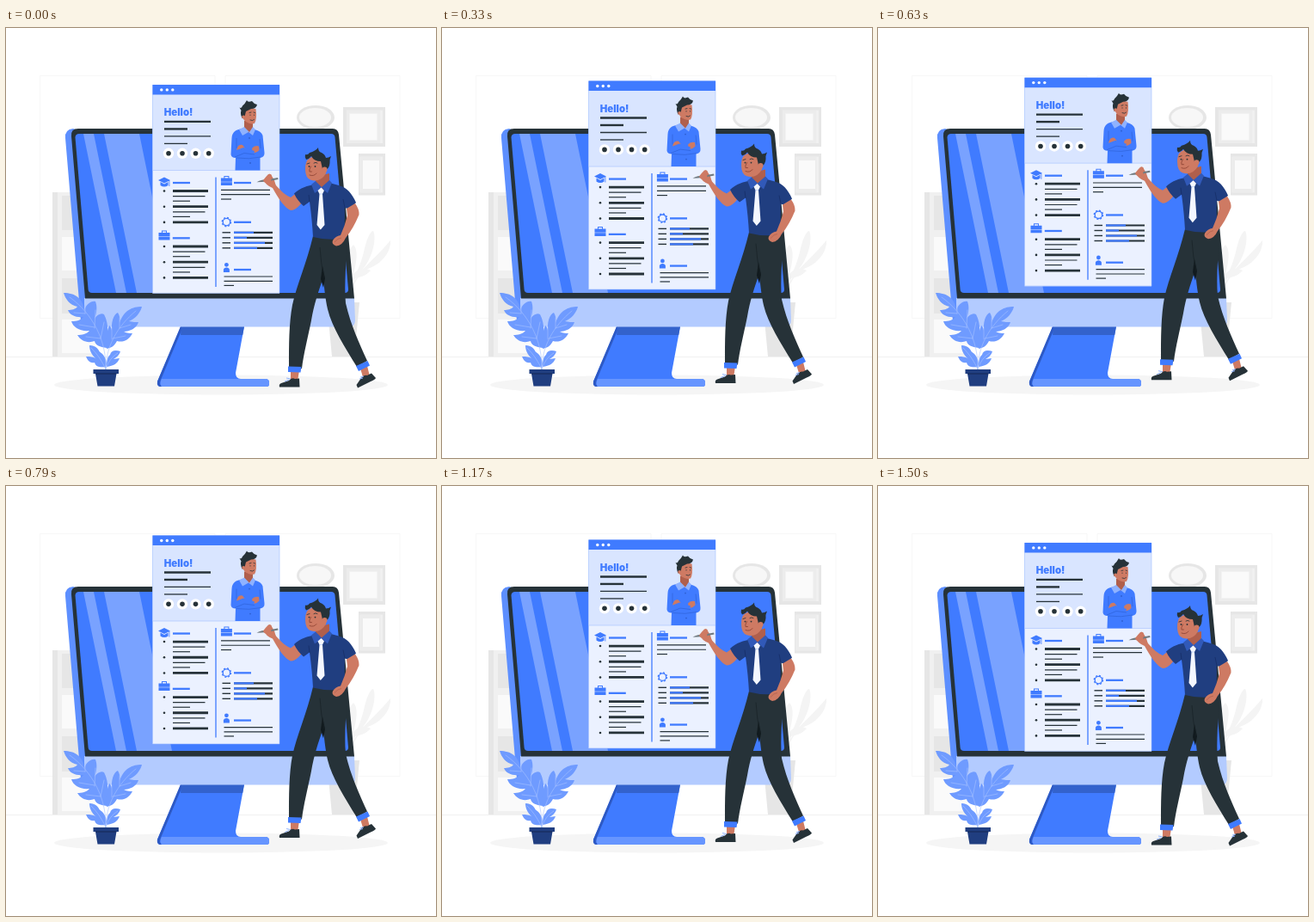
Animation of 500 by 500 pixels, one loop 1.54 s. Source, as an HTML page:

```html
<!DOCTYPE html>
<html lang="en">
<head>
<meta charset="utf-8">
<title>Resume illustration</title>
<style>
html, body { margin: 0; width: 100%; height: 100%; overflow: hidden; background: #fff; }
svg { display: block; width: 100%; height: 100%; }
.blue { fill: #407bff; }
.soft { fill: #6f9bff; }
.navy { fill: #203e80; }
.dark { fill: #263238; }
.skin { fill: #ce7a63; }
.shade { fill: #b05f4c; }
.vein { fill: none; stroke: #a6c2ff; stroke-width: .6; stroke-linecap: round; }
.ink { fill: none; stroke: #263238; stroke-width: .8; stroke-linecap: round; stroke-linejoin: round; }
</style>
</head>
<body>
<svg viewBox="0 0 500 500">
  <!-- room -->
  <g fill="none" stroke="#f4f4f4" stroke-width=".7">
    <path d="M39.5 55.5H243V337.5H39.5ZM255 55.5H458V337.5H255Z"/>
    <path d="M0 382.5H500" stroke="#ebebeb"/>
  </g>
  <g>
    <path d="M54 191H60V382H54Z" fill="#e6e6e6"/>
    <path d="M60 191H104V382H60Z" fill="#f0f0f0"/>
    <path d="M65 195H104V235H65ZM65 291H104V332H65Z" fill="#e6e6e6"/>
    <path d="M65 243H104V282H65ZM65 339H104V378H65Z" fill="#fafafa"/>
  </g>
  <ellipse cx="360" cy="104" rx="22" ry="14" fill="#e6e6e6"/>
  <ellipse cx="359.5" cy="104" rx="18.5" ry="11" fill="#f7f7f7"/>
  <path d="M392 92H441V138H392ZM410 146H441V194.500H410Z" fill="#e6e6e6"/>
  <path d="M396 95.500H438V134H396ZM413.500 149.500H438V191.500H413.500Z" fill="#f0f0f0"/>
  <path d="M396 95.500H435V134H396ZM411 149.500H435.500V191.500H411Z" fill="#ececec"/>
  <path d="M399.500 99.500H431.500V130.500H399.500ZM415 154H434V187H415Z" fill="#fafafa"/>
  <g fill="#f4f4f4">
    <path d="M396 300C397 275 397 258 404 252C411 259 407 278 400 300Z"/>
    <path d="M401 292C408 288 414 270 417 256C420 243 425 235 427 236C430 241 429 258 420 273C413 284 407 291 401 296Z"/>
    <path d="M402 300C412 279 427 271 447 247C448 260 437 274 423 279C413 283 409 290 404 300Z"/>
    <path d="M404 286C410 279 417 279 424 282C418 289 411 290 404 291Z"/>
  </g>
  <path d="M373 319H411L405 382H379Z" fill="#e6e6e6"/>
  <ellipse cx="250" cy="415" rx="194" ry="11.500" fill="#f5f5f5"/>

  <!-- computer -->
  <path class="blue" d="M203 347H277L267 401Q267 408 273 408H303Q306 409 306 412V414Q306 417 303 417H180Q175.500 417 176 411L202 350Z"/>
  <path d="M203 347H206L180 409Q178 414 181 417H180Q175 417 176 411Z" fill="#2d59c4"/>
  <path d="M204 347H277L275.200 357H203Z" fill="#3362cc"/>
  <path d="M181 408H303Q306 409 306 412V414Q306 417 303 417H181Q178 414 181 408Z" fill="#6695ff"/>
  <path d="M78 117Q68 118 69 128L87 341Q88 347 96 347L100 314L81 118Z" fill="#5d8fff"/>
  <path d="M91 314H405L406 340Q406 347.500 399 347.500H97Q92 347.500 91 341Z" fill="#b3cbff"/>
  <path class="dark" d="M84 117H380Q386 117 387 124L405 314.500H92L76 126Q75 117 84 117Z"/>
  <path class="blue" d="M85 123H378Q382 123 382.500 127L398 304Q398 308 394 308H100Q96 308 95.600 304L80.500 127Q81 123 85 123Z"/>
  <path d="M90 123H102L140 308H128ZM114 123H155L193 308H152Z" fill="#79a2ff"/>

  <!-- desk plant -->
  <g class="soft">
    <path d="M117 372C109 371 104 369 103 364C95 367 87 364 83 357C88 357 94 356 97 352C86 353 78 348 76 341C82 341 87 340 90 336C82 337 74 334 72 328C76 328 81 327 83 324C74 322 69 315 67 308C80 308 90 314 91 329C93 321 99 317 104 318C106 323 106 330 103 338C106 333 111 331 114 333C120 344 119 360 117 372Z"/>
    <path d="M117 373C116 360 118 350 120 346C122 347 123 350 123 354C122 342 125 333 130 331C132 334 133 338 132 343C137 328 147 324 158 324C156 332 150 338 143 341C147 342 151 342 154 342C152 349 144 353 137 353C141 355 144 355 147 355C143 363 136 366 129 364C126 370 122 372 117 373Z"/>
    <path d="M116 394C110 395 104 394 103 389C98 390 95 387 93 382C98 382 102 382 105 385C99 380 97 374 97 369C105 369 109 374 110 381C115 383 117 388 116 394Z"/>
    <path d="M117 394C117 387 118 382 121 380C122 375 127 374 133 376C132 380 129 383 125 385L132 384C130 390 125 393 117 394Z"/>
    <path d="M116 396C111 384 108 381 107 376C112 377 116 383 117 390Z"/>
  </g>
  <path class="vein" d="M116 397C117 365 102 333 74 313M116 397C116 371 129 347 151 329M116 397C112 388 107 380 99 372M116 397C119 388 123 382 130 378M92 332V322M103 349L104 328M110 361L114 342M92 332L79 331M103 348L85 345M110 361L93 359M132 349V337M123 362V348M132 349L145 345M124 361L139 358"/>
  <path class="navy" d="M101.500 397H131V402H128.500L126 416.500H106.500L104 402H101.500Z"/>
  <path d="M104 401H128.500L128 403H104.500Z" fill="#1a3269"/>

  <!-- page and presenter -->
  <g id="lift">
    <g id="page">
      <path d="M170.500 66H318V308.500H170.500Z" fill="#ebf1ff"/>
      <path d="M170.500 77H318V165.500H170.500Z" fill="#d9e5ff"/>
      <path d="M170.500 66.300H318V308.300H170.500ZM170.500 165.500H318" fill="none" stroke="#a3bfff" stroke-width=".6"/>
      <path class="blue" d="M170.500 66H318V77.500H170.500Z"/>
      <text class="blue" x="183.700" y="102" font-family="Inter, sans-serif" font-size="11.400" font-weight="900">Hello!</text>
    </g>

    <!-- portrait -->
    <path class="blue" d="M275 117C267 118 263 121 262.500 128L261.500 147Q262 151 267 151L266.500 165.500H295.500L295.500 151Q301 150 300.500 145L298.500 125Q297 120 289 118Z"/>
    <path d="M268 128V140M295 129L296 140M268 151Q283 153 296 150" fill="none" stroke="#2d5fd0" stroke-width=".6"/>
    <path class="shade" d="M277 108H287V119Q283 124 277 119Z"/>
    <path class="skin" d="M275 97Q277 92 284 93L290.500 94Q292 106 289 111Q284 112.500 279 109Q275 106 275 101Z"/>
    <path class="dark" d="M274.500 105Q272 99 273.500 96L271.500 92.500Q274 94 275 90.500Q278 88 280 84Q281 87 286 85Q288 88 292 89Q291 94 285 94Q281 96 279 97L277.500 103Z"/>
    <circle class="skin" cx="276.200" cy="103.500" r="2"/>
    <path class="ink" stroke-width=".6" d="M283 98.500L285 98M288 98L289.500 98.500M284 101V101.500M288.500 101V101.500M284 107Q287 108.500 288.500 106.500"/>
    <path d="M277 115L271 118L275 125L282 121L287 125L290 118L287 115L283 121Z" fill="#8fb2ff"/>
    <path class="skin" d="M269 139Q271 135 275 136L278 140L275 145L270 145Q267 143 269 139ZM286 140Q289 136 294 137.500L294.500 142Q291 146 287 145Z"/>
    <path class="blue" d="M263 144L276 139L289 143L288 147L277 145.500L266 150Z"/>
    <path d="M266 150L277 145.500L289 147" fill="none" stroke="#2d5fd0" stroke-width=".6"/>
    <g fill="#2d5fd0"><circle cx="283" cy="128" r=".9"/><circle cx="284" cy="157" r=".9"/></g>

    <!-- shoes and ankles -->
    <path class="skin" d="M412 396L420 393L423 405L416 409Z"/>
    <path class="dark" d="M409 418.500L407.500 415L413 407Q416 403 420 404Q423 402 425 401.500L430 407Q429 409 424 411Z"/>
    <path d="M412 406L416 405M411 408L415 407" stroke="#8fb2ff" stroke-width="1"/>
    <path class="skin" d="M331 398H341L339 411H331Z"/>
    <path class="dark" d="M318 417.500Q317 414 320 413L329 410Q332 406 336 408L341 407.500L341.500 417.500Z"/>
    <path d="M324 411L329 409M326 407L331 408" stroke="#8fb2ff" stroke-width="1"/>

    <!-- trousers -->
    <path class="dark" d="M357 242L397 245C396 270 393 297 395 320C401 346 411 367 420 387L408 394C394 371 379 348 374 327C371 313 370 302 369 290C363 307 358 322 355 340C351 360 346 379 344 396L329 395C329 368 329 343 333 322C338 299 350 272 357 242Z"/>
    <path d="M368 277L366 292L369 302L371 291Z" fill="#111a1e"/>
    <path d="M365 255Q366 274 370 291" fill="none" stroke="#172126" stroke-width=".7"/>
    <path class="blue" d="M328 393.500L343.500 394L342.500 400.500L328 400ZM407 393L420.500 387L423 392.500L410 399Z"/>

    <!-- raised arm -->
    <path class="skin" d="M346 200C342 206 337 212 331 212C325 210 317 199 310 186Q302 183 300 177Q304 174 305 171Q307 168 309 172L312 177Q313 181 314 183C320 190 326 195 331 197L339 191Z"/>
    <path d="M291.500 179.200Q297 176 305 176L316 174L316.500 176L304 178.500Q297 179 291.500 179.200Z" fill="#717b80"/>
    <path class="skin" d="M299 177Q302 173 305 170Q309 169 309 173L308 179Q304 182 300 179Z"/>

    <!-- torso and lowered arm -->
    <path class="navy" d="M359 182C351 183 342 186 335 192.500Q339 201 346 207L353 202Q356 224 357 243Q376 248 396 244Q393 235 394 209L397 210Q403 208 407 203C402 192 397 186 387 183L376 180Z"/>
    <path d="M353 202L352 194M394 209L392 199" stroke="#152c63" stroke-width=".7"/>
    <path class="skin" d="M396 210L406 204Q411 211 410.500 217Q404 233 395 244Q391 253 384 253.500Q378 251 380 247Q383 242 389 241Q394 230 397 218Z"/>
    <path d="M382 249Q386 244 390 244" fill="none" stroke="#b05f4c" stroke-width=".7"/>
    <path class="shade" d="M360 173L376 169L376 181L367 189L360 182Z"/>
    <path d="M360 178L355 182L359 192L367 186L374 192L379 180L376 177L367 185Z" fill="#3159b8"/>
    <path d="M366.500 185.500L370 189L368 193L370.500 229L365.800 234.500L361.500 229L364.500 193L362.500 189Z" fill="#f4f7ff"/>
    <path d="M364.500 193H368" stroke="#b3cbff" stroke-width=".7"/>

    <!-- head -->
    <path class="skin" d="M350 154Q358 146 370 151Q375 158 372 169Q367 178 358 177.500Q350 177 348.500 169Q347 160 350 154Z"/>
    <path class="dark" d="M349 153Q347 150 348 147Q351 148 353 145Q360 143 363 139Q363 144 367 145Q371 147 372 151Q375 151 378 149Q376 153 376.500 157Q376 163 372 165L368 164Q367 159 366 155Q358 155 355 149Q353 152 349 153Z"/>
    <circle class="skin" cx="370.500" cy="164.500" r="3"/>
    <path class="ink" d="M350 158L353 157M358 157Q360 155.500 362 157"/>
    <circle class="dark" cx="352.500" cy="161" r=".9"/><circle class="dark" cx="359.500" cy="161" r=".9"/>
    <path d="M354.500 161Q352 165 353 167H355.500M353 171Q358 173 361 169" fill="none" stroke="#8c4032" stroke-width=".8" stroke-linecap="round"/>
  </g>
</svg>
<script>
const NS = 'http://www.w3.org/2000/svg';
const BLUE = '#407bff', DARK = '#263238';
const page = document.getElementById('page');
const lift = document.getElementById('lift');

function add(tag, attrs) {
  const el = document.createElementNS(NS, tag);
  for (const key in attrs) el.setAttribute(key, attrs[key]);
  page.appendChild(el);
}
const line = (x1, x2, y, w = 1.2, stroke = DARK) =>
  add('path', { d: `M${x1} ${y}H${x2}`, stroke, 'stroke-width': w });
const dot = (cx, cy, r, fill) => add('circle', { cx, cy, r, fill });
const shape = (x, y, d, fill = BLUE) =>
  add('path', { d, fill, transform: `translate(${x} ${y})` });
const heading = (x, y) => line(x, x + 20, y, 2.3, BLUE);

function briefcase(x, y) {
  shape(x, y, 'M-6.500 -3H6.500V1.200H-6.500ZM-6.500 1.700H6.500V5.500H-6.500ZM-3 -3V-5.500H3V-3H2V-4.500H-2V-3Z');
}

function bullets(y) {
  for (let i = 0; i < 3; i++, y += 18.2) {
    dot(184, y, 1.3, DARK);
    line(194, 235, y, 2.8);
    if (i < 2) {
      line(194, 231.5, y + 6.1);
      line(194, 214, y + 11.7);
    }
  }
}

// title bar and intro
for (const x of [180.8, 187.3, 193.8]) dot(x, 71.9, 1.7, '#fff');
[[238, 2.4], [211, 2.4], [238, 1.3], [211, 1.3]].forEach(([x, w], i) => line(184, x, 108.9 + 8.5 * i, w));
for (const x of [189, 205, 220.5, 235.7]) {
  dot(x, 145.8, 6.2, '#fff');
  dot(x, 145.8, 2.8, DARK);
}

// left column
shape(184, 179, 'M-7 -2L0 -5.500L7 -2L0 1.500ZM-4.500 0L0 2.500L4.500 0V4Q0 7 -4.500 4ZM5.500 -1.500H6.300V5H5.500Z');
heading(194, 180);
bullets(189.5);
briefcase(184, 241);
heading(193.8, 244.3);
bullets(254);
add('path', { d: 'M244 173.500V301', stroke: BLUE, 'stroke-width': 1.3 });

// right column
briefcase(256.4, 177.5);
heading(265, 180);
line(250, 307, 188.3);
line(250, 307, 193.7);
line(250, 262, 199);
add('circle', { cx: 256.4, cy: 225.6, r: 4.2, fill: 'none', stroke: BLUE, 'stroke-width': 1.3 });
add('circle', { cx: 256.4, cy: 225.6, r: 5.2, fill: 'none', stroke: BLUE, 'stroke-width': 1.3, 'stroke-dasharray': '2.04 2.04' });
heading(265, 225.8);
[288, 280, 301, 292].forEach((x, i) => {
  const y = 237.8 + 6 * i;
  line(251.5, 261, y, 1.4);
  line(265, 310, y, 2.2);
  line(265, x, y, 2.2, BLUE);
});
dot(256.4, 275.3, 2.4, BLUE);
shape(256.4, 281, 'M-3.500 3V0Q-3 -2.500 0 -2.500Q3 -2.500 3.500 0V3Z');
heading(265, 281);
line(253.5, 310, 289);
line(253.5, 310, 294.3);
line(253.5, 265, 299.4);

// a steady rise and fall, stepped 24 times a second
const LOOP = 1540, STEP = 1000 / 24, CYCLE = 1500, LEAD = 36, RISE = 10, REST = 0.5;

function draw(ms) {
  const t = Math.floor((ms % LOOP) / 10) * 10 + 5;
  const at = ((Math.floor(t / STEP) * STEP + LEAD) % CYCLE) / CYCLE;
  const up = RISE * (1 - Math.abs(1 - 2 * at));
  lift.setAttribute('transform', `translate(0 ${(REST - up).toFixed(3)})`);
}

const start = performance.now();
function tick() {
  draw(performance.now() - start);
  requestAnimationFrame(tick);
}
tick();
</script>
</body>
</html>
```
